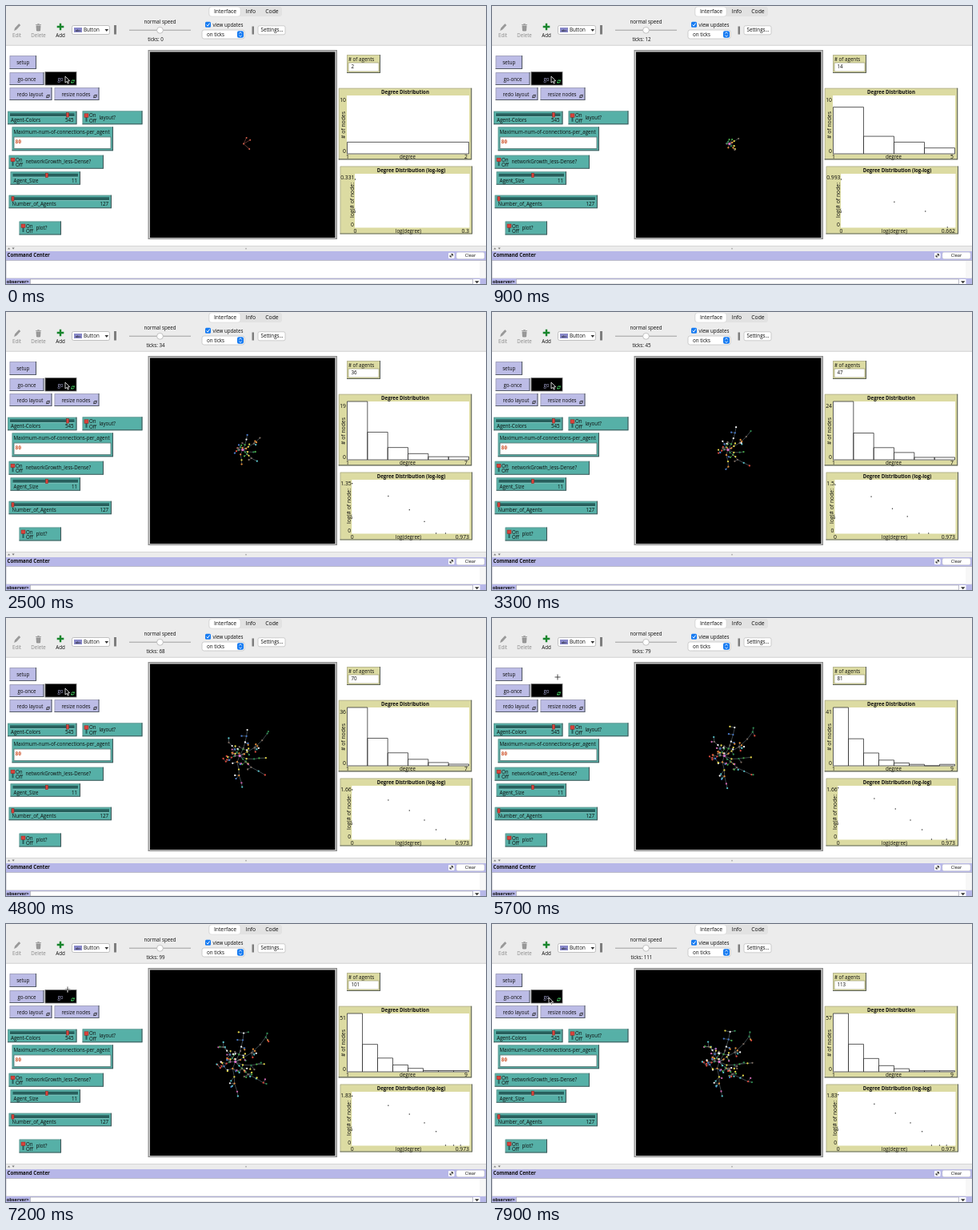
Write an HTML page that moves like this. It is 600 by 348 pixels and loops after 8000 ms.

```html
<!DOCTYPE html>
<html lang="en">
<head>
<meta charset="utf-8">
<title>Growing network model</title>
<style>
  html, body { margin: 0; width: 100%; height: 100%; overflow: hidden; background: #fff; }
  svg { display: block; width: 600px; height: 348px; }
  text { font: 500 6.2px "Open Sans", "Noto Sans", sans-serif; fill: #0c0c0c; white-space: pre; }
  .b { font-weight: 700; font-size: 6.1px; }
  .m { text-anchor: middle; }
  .e { text-anchor: end; }
  .dim { fill: #8a8a8a; }
  .num, .tab { font-size: 6.8px; }
  .small { font-size: 5.6px; }
  .input { font: 700 6.4px "DejaVu Sans Mono", monospace; fill: #cc4a20; }
</style>
</head>
<body>
<svg id="stage" viewBox="0 0 600 348"></svg>
<script>
const TEAL = '#56b0a7', LILAC = '#bcbce6', KHAKI = '#dcdba2';
const out = [];
const add = (...parts) => out.push(...parts);

const rect = (x, y, w, h, fill, extra = '') =>
  `<rect x="${x}" y="${y}" width="${w}" height="${h}" fill="${fill}" ${extra}/>`;
const text = (x, y, s, cls = '', extra = '') =>
  `<text x="${x}" y="${y}" class="${cls}" ${extra}>${s}</text>`;
const path = (d, stroke, w = 1, fill = 'none', extra = '') =>
  `<path d="${d}" stroke="${stroke}" stroke-width="${w}" fill="${fill}" ${extra}/>`;
const circle = (x, y, r, fill, extra = '') =>
  `<circle cx="${x}" cy="${y}" r="${r}" fill="${fill}" ${extra}/>`;

// Raised panel: light top-left edge, dark bottom-right edge
const panel = (x, y, w, h, fill) =>
  rect(x, y, w, h, fill) +
  path(`M${x + .5} ${y + h}V${y + .5}H${x + w}`, '#777', 1, 'none', 'opacity=".35"') +
  path(`M${x} ${y + h - .5}H${x + w - .5}V${y}`, '#3c4448', 1.1, 'none', 'opacity=".8"');

const loopMark = (x, y, c) =>
  path(`M${x - 1.7} ${y}a1.8 1.8 0 0 1 3.2-1M${x + 1.7} ${y}a1.8 1.8 0 0 1-3.2 1`, c, .9) +
  path(`M${x + 2.2} ${y - 2.4}v2h-2zM${x - 2.2} ${y + 2.4}v-2h2z`, 'none', 0, c);

function button(x, y, w, h, label, loop) {
  add(panel(x, y, w, h, LILAC), text(x + w / 2 - (loop ? 1 : 0), y + h / 2 + 2.8, label, 'm'));
  if (loop) add(loopMark(x + w - 5, y + h - 5, '#222'));
}

const knob = (x, y, w, h) => rect(x, y, w, h, '#d8433c', 'stroke="#8d2420" stroke-width=".5"');

function slider(x, y, w, label, value, knobX) {
  add(panel(x, y, w, 16.5, TEAL),
    rect(x + 3, y + 2.6, w - 6, 4, '#275f5c'), rect(x + 3, y + 6.6, w - 6, .7, '#8fd0c9'),
    knob(knobX - 1.5, y + 2, 3, 5.4),
    text(x + 4, y + 13.6, label), text(x + w - 4, y + 13.6, value, 'e'));
}

function toggle(x, y, w, label) {
  add(panel(x, y, w, 17, TEAL), rect(x + 4, y + 4, 2, 9.5, '#275f5c'), knob(x + 2.5, y + 3.5, 5, 4.5),
    text(x + 8.5, y + 8, 'On'), text(x + 8.5, y + 14.2, 'Off'), text(x + 21, y + 10.2, label));
}

function toolbar() {
  add(rect(0, 0, 600, 49, '#ececec'), rect(0, 48.8, 600, .8, '#c6c6c6'),
    rect(253, 1, 92, 12, '#e2e2e2', 'rx="3"'),
    rect(254, 1, 39, 12, '#fff', 'rx="3" stroke="#ccc" stroke-width=".5"'),
    text(274, 9.4, 'Interface', 'm tab'), text(306, 9.4, 'Info', 'm tab'), text(332.5, 9.4, 'Code', 'm tab'));

  add(path('M10.5 30.5l1-3 4.6-5 1.8 1.6-4.7 5.2z', '#888', .5, '#999'), text(13.5, 38.8, 'Edit', 'm dim'),
    path('M38 25h5l-.5 6h-4zM37 23.6h7M39.3 22.6h2.4', '#888', .8, '#999'), text(40.5, 38.8, 'Delete', 'm dim'),
    path('M68 21.7v8.6M63.7 26h8.6', '#17852c', 2.4), text(68, 38.8, 'Add', 'm'));

  add(rect(82.5, 24.5, 47, 11, '#fff', 'rx="2" stroke="#aaa" stroke-width=".7"'),
    rect(85, 27, 10, 6, '#8888c8'), text(90, 31.7, 'abc', 'm', 'style="font-size:4px"'),
    text(97, 32.2, 'Button'), path('M123.5 28.9h4.6l-2.3 3z', 'none', 0, '#333'),
    rect(135, 24, 3, 11.5, '#7d7d7d'), rect(307.5, 25.5, 2.5, 10, '#7d7d7d'));

  add(text(192.5, 22, 'normal speed', 'm'), rect(154, 29.6, 77, 1.4, '#b4b4b4'),
    circle(192.5, 30.3, 3.9, '#fff', 'stroke="#aaa" stroke-width=".7"'),
    rect(249, 19.8, 7, 7, '#167bf2', 'rx="1.5"'), path('M250.7 23.4l1.5 1.7 2.3-3.6', '#fff', 1),
    text(258.5, 25.6, 'view updates'),
    rect(245, 30, 53, 11, '#fff', 'rx="2.5" stroke="#bbb" stroke-width=".7"'),
    text(251, 37.8, 'on ticks'), rect(289, 31.2, 8, 8.6, '#167bf2', 'rx="2"'),
    path('M291.3 34.6l1.7-1.9 1.7 1.9M291.3 36.4l1.7 1.9 1.7-1.9', '#fff', .8),
    rect(315, 24.8, 34, 11, '#fff', 'rx="2" stroke="#bbb" stroke-width=".7"'),
    text(332.5, 32.3, 'Settings...', 'm'));
}

function controls() {
  button(4.5, 62, 33.5, 17, 'setup');
  button(4.5, 83, 43, 16, 'go-once');
  button(4.5, 102, 53, 16, 'redo layout', true);
  button(60.5, 102, 56, 16, 'resize nodes', true);
  add(rect(49, 82.5, 39, 16.5, '#000', 'stroke="#777" stroke-width=".8"'),
    text(68, 93.6, 'go', 'm', 'style="fill:#a9a9d6"'), loopMark(83.5, 94.5, '#4be06a'));

  slider(2, 131.7, 86.5, 'Agent-Colors', 545, 77);
  toggle(95.5, 131.3, 75, 'layout?');
  add(panel(7.5, 151.3, 126.5, 30, TEAL), text(9.5, 160, 'Maximum-num-of-connections-per_agent'),
    rect(10, 164, 121, 14.5, '#fff', 'stroke="#57706e" stroke-width=".8"'),
    text(11.5, 172, '80', 'input'));
  toggle(3.5, 186.7, 118.5, 'networkGrowth_less-Dense?');
  slider(5.5, 207.2, 87.5, 'Agent_Size', 11, 51);
  slider(3.5, 236.7, 128.5, 'Number_of_Agents', 127, 8.5);
  toggle(16.5, 269.5, 52.5, 'plot?');
}

function displays() {
  add(rect(177.5, 55, 236.5, 237, '#8c8c8c'), rect(178.7, 56.2, 234, 234.6, '#cfcfcf'),
    rect(180, 57.5, 231.3, 232.5, '#000'));
  add(panel(426, 61, 42, 23, KHAKI), text(428, 69, '# of agents'),
    rect(428, 71, 38, 11, '#fff', 'stroke="#99986c" stroke-width=".7"'));
  add(panel(415.7, 102.7, 166.5, 89.7, KHAKI), text(499, 110, 'Degree Distribution', 'm b'),
    rect(426, 112, 153, 73.5, '#fff'), text(502, 190.6, 'degree', 'm'),
    text(427, 190.8, '1', 'm num'),
    text(0, 0, '# of nodes', 'm num', 'transform="translate(423.6 149)rotate(-90)"'));
  add(panel(417.5, 200.5, 165.5, 85, KHAKI), text(506.5, 208.1, 'Degree Distribution (log-log)', 'm b'),
    text(503, 283.6, 'log(degree)', 'm'));
}

function commandCenter() {
  add(rect(0, 300.5, 600, 6.5, '#ececec'), path('M0 300.5H600', '#c8c8c8', .7),
    path('M2 304.6l1.6-2.2 1.6 2.2zM7.5 302.6l1.6 2.2 1.6-2.2z', 'none', 0, '#777'),
    circle(300, 303.7, .9, '#aaa'),
    rect(0, 307, 600, 11.5, '#b7b7e8'), text(1.5, 314.4, 'Command Center', 'b'),
    rect(553, 309, 7.5, 7, '#fff', 'rx="1"'),
    path('M555 314l3.5-3.4M556 310.6h2.5v2.5M555 311.8v2.2h2.4', '#222', .8),
    rect(563, 308.3, 35, 8.2, '#fff', 'rx="2" stroke="#ccc" stroke-width=".5"'),
    text(580.5, 314.2, 'Clear', 'm small'),
    rect(0, 318.5, 600, 22.5, '#fff', 'stroke="#a5a5b5" stroke-width=".7"'),
    rect(592, 319, 7.5, 21.5, '#f7f7f7'),
    rect(0, 341, 600, 7, '#b7b7e8'), rect(30.5, 342, 553, 6, '#fff', 'stroke="#999" stroke-width=".5"'),
    text(.8, 347.4, 'observer&gt;', 'b small'),
    rect(584, 342, 8.5, 6, '#fff'), path('M586 344.3h5.4l-2.7 3z', 'none', 0, '#333'));
}

add(rect(0, 0, 600, 348, '#fff'));
toolbar(); controls(); displays(); commandCenter();
const stage = document.getElementById('stage');
stage.innerHTML = out.join('') + '<g id="live"></g>';
const live = document.getElementById('live');

const LAST_TICK = 111, STEPS = 4;
const colors = ['#f4f4f4', '#d8483c', '#46a848', '#e6d84a', '#4878c8', '#e08c3a', '#58c0c8', '#c864ac', '#7a6a60', '#2f8a50'];

let seed = 11;
const random = () => (seed = (seed * 16807) % 2147483647) / 2147483647;
const pick = list => list[Math.floor(random() * list.length)];

// Tree in offsets from the root: bowed arms grow step by step towards these tips,
// and in between leaves sprout from the nodes of the arms
const tips = [[38, -32], [36, 25], [12, -37], [-17, 6], [2, 37], [36, 2], [-14, -19]];
const root = { x: 0, y: 0, color: '#e070c8', birth: -3 };
const nodes = [root], spine = [root];

function armNode(k) {
  const [tx, ty] = tips[k % tips.length];
  const f = (Math.floor(k / tips.length) + 1) / STEPS;
  const bow = .3 * f * (1 - f), jitter = f < 1 ? 3 : 0;
  return {
    x: tx * f - ty * bow + (random() - .5) * jitter,
    y: ty * f + tx * bow + (random() - .5) * jitter,
    parent: k < tips.length ? root : spine[k - tips.length + 1]
  };
}

function leafNode() {
  const parent = pick(spine);
  const a = Math.atan2(parent.y, parent.x) + (random() - .5) * 3.8, d = 3.5 + random() * 3.5;
  return { x: parent.x + d * Math.cos(a), y: parent.y + d * Math.sin(a), parent };
}

for (let k = 1; k < LAST_TICK + 3; k++) {
  const isArm = spine.length <= tips.length * STEPS && (k < 3 || k % 2);
  const node = isArm ? armNode(spine.length - 1) : leafNode();
  if (isArm) spine.push(node);
  nodes.push(Object.assign(node, { color: pick(colors), birth: k - 3, phase: random() * 6.3 }));
}

function track(keys, t) {
  let i = 1;
  while (i < keys.length - 1 && t > keys[i][0]) i++;
  const [a, ...u] = keys[i - 1], [b, ...v] = keys[i];
  const f = Math.min(1, Math.max(0, (t - a) / (b - a)));
  return u.map((n, j) => n + (v[j] - n) * f);
}

const tickKeys = [[0, 0], [1600, 22], [3300, 45], [4800, 68], [5700, 79], [7200, 99], [7900, LAST_TICK]];
const cursorKeys = [[5000, 74, 88], [5700, 82, 74], [6500, 82, 74], [7200, 77, 82], [7900, 71, 92]];

function network(tick) {
  const rest = Math.min(1, (LAST_TICK - tick) / 89);
  const spread = 1 - .43 * rest * rest + .25 * Math.exp(-tick / 4);
  root.px = 297 - 13 * (tick / LAST_TICK) ** 2;
  root.py = 172.5;
  const young = tick < 2;
  let lines = '', dots = '';
  for (const n of nodes) {
    if (n.birth > tick) break;
    const p = n.parent;
    if (p) {
      const grow = n.birth < 1 ? 1 : Math.min(1, .4 + (tick - n.birth) / 4);
      const sway = Math.sin(tick / 5 + n.phase) * .5;
      n.px = p.px + (n.x - p.x) * spread * grow + sway;
      n.py = p.py + (n.y - p.y) * spread * grow + sway * Math.cos(n.phase);
      lines += `M${p.px.toFixed(1)} ${p.py.toFixed(1)}L${n.px.toFixed(1)} ${n.py.toFixed(1)}`;
    }
    dots += circle(n.px.toFixed(1), n.py.toFixed(1), young ? 1 : p ? 1.15 : 1.6, young ? '#d8604c' : n.color);
  }
  return path(lines, young ? '#a0584c' : '#66757c', .6) + dots;
}

// Half the agents have one link, each further degree about half as many; one hub leads
function degreeCounts(agents) {
  const hub = agents < 75 ? Math.min(6, Math.ceil(agents / 4)) : 8;
  return Array.from({ length: hub }, (_, i) => {
    const n = Math.round(agents / 2 * .48 ** i + (i ? 0 : .5));
    return i === hub - 1 ? Math.max(1, n) : n;
  });
}

function histogram(counts) {
  const max = Math.max(10, counts[0]), w = 152 / counts.length;
  const bars = counts.map((n, i) => {
    const h = n / max * 73;
    return `M${426.5 + i * w} 185V${185 - h}h${w}V185`;
  });
  return path(bars.join('') + 'M426.5 185H578.5', '#333', .8) +
    text(425, 119.5, max, 'e num') + text(425, 184, '0', 'e num') +
    text(577, 190.8, counts.length + 1, 'e num');
}

function logPlot(counts) {
  // The axis stretches by a tenth whenever a value passes its end
  let max = .3;
  for (let n = 2; n <= counts[0]; n++) if (Math.log10(n) > max) max = Math.log10(n) * 1.1;
  const xMax = counts.length > 4 ? .973 : counts.length > 1 ? .662 : .3;
  const label = String(+max.toPrecision(3));
  const left = 417 + 3.8 * Math.min(5, label.length);
  const dots = counts.map((n, i) => n ? rect(
    left - .1 + Math.log10(i + 1) / xMax * 146, 276.4 - Math.log10(n) / max * 66, 1.2, 1.2, '#222') : '');
  return rect(left, 210, 579.5 - left, 67.5, '#fff') + dots.join('') +
    text(left - .5, 217.2, label, 'e num') + text(left - 1, 276, '0', 'e num') +
    text(0, 0, 'log(# of node:', 'm num', `transform="translate(${left - 1.4} 243)rotate(-90)"`) +
    text(left + .5, 283.6, '0', 'm num') + text(579, 283.6, xMax, 'e num');
}

function cursor(t) {
  const [x, y] = track(cursorKeys, t);
  if (t > 5100 && y < 84) {
    const cross = `M${x - 3.5} ${y}h7M${x} ${y - 3.5}v7`;
    return path(cross, '#fff', 1.6) + path(cross, '#222', .8);
  }
  return path(`M${x} ${y}v8l1.9-1.7 1.3 2.8 1.3-.6-1.3-2.7h2.5z`, '#fff', .8, '#000');
}

function draw(now) {
  const t = Math.floor(now % 8000 / 100) * 100;
  const [tick] = track(tickKeys, t);
  const shown = Math.floor(tick + .001), agents = shown + 2;
  const counts = degreeCounts(agents);
  live.innerHTML = text(187, 43.8, 'ticks: ' + shown, 'm') + text(431.5, 78.3, agents) +
    network(tick) + histogram(counts) + logPlot(counts) + cursor(t);
}

function loop() {
  draw(performance.now());
  requestAnimationFrame(loop);
}
loop();
</script>
</body>
</html>
```
